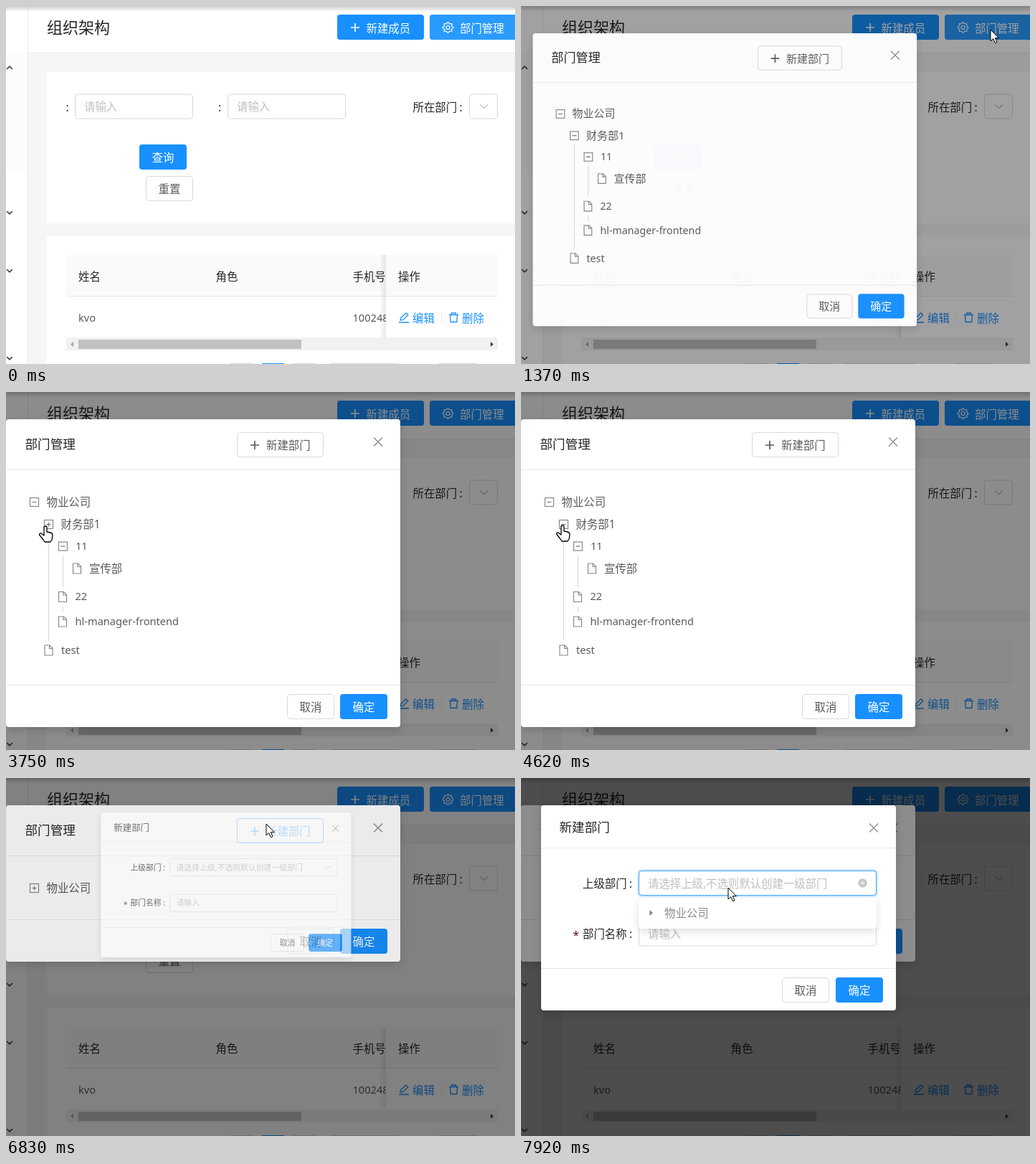
An HTML page for the animation above (8000 ms loop, 710 px wide and 499 px high).

```html
<!DOCTYPE html>
<html lang="zh">
<head>
<meta charset="utf-8">
<style>
html, body { margin: 0; width: 100%; height: 100%; overflow: hidden; background: #fff; }
svg { display: block; font-family: "Noto Sans", "Noto Sans CJK SC", "Noto Sans CJK", sans-serif; font-weight: 350; }
.panel { filter: drop-shadow(0 4px 6px rgba(0, 0, 0, .15)); }
</style>
</head>
<body>
<svg id="stage" width="710" height="499" viewBox="0 0 710 499"></svg>
<script>
const BLUE = '#1890ff', DARK = 'rgba(0,0,0,.85)', TEXT = 'rgba(0,0,0,.65)', HINT = '#bfbfbf', LINE = '#e8e8e8';
const LOOP = 8000, ROOT_H = 211, SUB_H = 145;

// Drawing helpers; text is placed by its left edge and vertical middle
const text = (x, y, s, fill = TEXT, size = 15.4) =>
  `<text x="${x}" y="${y + size * .36}" font-size="${size}" fill="${fill}">${s}</text>`;
const latin = (x, y, s) => text(x, y, s, TEXT, 14.6);
const rect = (x, y, w, h, fill, more = '') =>
  `<rect x="${x}" y="${y}" width="${w}" height="${h}" fill="${fill}" ${more}/>`;
const path = (d, stroke, width = 1, more = '') =>
  `<path d="${d}" fill="none" stroke="${stroke}" stroke-width="${width}" ${more}/>`;
const outline = (x, y, w, h, more = '') =>
  rect(x + .5, y + .5, w - 1, h - 1, '#fff', `rx="4" stroke="#d9d9d9" ${more}`);
const input = (x, y, w, hint) => outline(x, y, w, 35) + text(x + 13, y + 18, hint, HINT);
const button = (x, y, label) => outline(x, y, 66, 35) + text(x + 17.5, y + 18, label);
const primary = (x, y, label) => rect(x, y, 66, 35, BLUE, 'rx="4"') + text(x + 17.5, y + 18, label, '#fff');
const plus = (x, y, color) => path(`M${x - 6} ${y}h12M${x} ${y - 6}v12`, color, 1.7);
const close = (x, y) => path(`M${x - 6} ${y - 6}l12 12m0-12l-12 12`, 'rgba(0,0,0,.45)', 1.4);
const chevron = (x, y, w, color, width, dir = 1) =>
  path(`M${x - w} ${y - dir * w / 2}l${w} ${dir * w} ${w} ${-dir * w}`, color, width);
const hline = (x, y, w) => rect(x, y, w, 1, LINE);

const toggle = (x, y, id) => rect(x - 6, y - 6, 12, 12, '#fff', 'stroke="#888" stroke-width="1.2"') +
  path(`M${x - 3} ${y}h6`, '#777', 1.2) + (id ? path(`M${x} ${y - 3}v6`, '#777', 1.2, `id="${id}"`) : '');
const file = (x, y) => path(`M${x - 5.5} ${y - 7}h7l4 4v10h-11zM${x + 1} ${y - 7}v4.5h4.5`, '#888', 1.2);
const guide = (x, y, h) => rect(x, y, 1, h, '#d9d9d9');

function gear(x, y) {
  let d = '';
  for (let i = 0; i < 32; i++) {
    const a = (i - .5) / 32 * 2 * Math.PI, r = i % 4 < 2 ? 7.2 : 5.7;
    d += `${i ? 'L' : 'M'}${x + r * Math.sin(a)} ${y - r * Math.cos(a)}`;
  }
  return path(d + 'z', '#fff', 1.2) + `<circle cx="${x}" cy="${y}" r="2.5" fill="none" stroke="#fff" stroke-width="1.2"/>`;
}

const page =
  rect(0, 0, 710, 499, '#f5f6f8') + rect(0, 0, 30, 499, '#fff') + rect(0, 65, 30, 163, '#fcfcfc') +
  rect(30, 0, 1, 499, '#ebebeb') + rect(31, 0, 679, 65, '#fff') + hline(31, 65, 679) +
  rect(0, 0, 710, 8, 'url(#top)') +
  chevron(5, 86, 3.8, '#444', 1.6, -1) + [288, 369, 491].map(y => chevron(5, y, 3.8, '#444', 1.6)).join('') +
  text(57, 30, '组织架构', DARK, 22) +
  rect(462, 12, 121, 35, BLUE, 'rx="4"') + plus(487, 30, '#fff') + text(502.5, 31, '新建成员', '#fff') +
  rect(591, 12, 130, 35, BLUE, 'rx="4"') + rect(591, 12, 130, 35, '#40a9ff', 'rx="4" id="hover"') +
  gear(616.5, 30) + text(633, 31, '部门管理', '#fff') +
  // Search form
  rect(57, 92, 653, 211, '#fff') +
  text(83.5, 141, ':', DARK) + input(96, 122.5, 165, '请输入') +
  text(296, 141, ':', DARK) + input(309, 122.5, 165, '请输入') +
  text(567.5, 141, '所在部门', DARK) + text(632.5, 141, ':', DARK) +
  outline(646, 122.5, 40, 35) + chevron(666.5, 140, 5.5, HINT, 1.2) +
  primary(186, 193, '查询') + button(195, 237, '重置') +
  // Table
  rect(57, 321, 653, 178, '#fff') + rect(84, 347, 602, 57, '#fafafa') + hline(84, 404, 602) +
  text(101, 377, '姓名', DARK) + text(292.5, 377, '角色', DARK) + text(483.5, 377, '手机号', DARK) +
  latin(101, 435, 'kvo') + latin(483.5, 435, '100248') +
  rect(530, 347, 156, 57, '#fafafa') + rect(530, 405, 156, 57, '#fff') + rect(521, 347, 9, 115, 'url(#side)') +
  text(547, 377, '操作', DARK) + hline(530, 404, 156) +
  path('M548 441h14M550 438l.8-3.5 7.2-6.5 2.8 2.8-7 6.6z', BLUE, 1.3) + text(567, 435, '编辑', BLUE) +
  rect(607, 429, 1, 12, LINE) +
  path('M618 430.5h13M621.5 430v-2h6v2M619.5 431l.7 9.5h8.6l.7-9.5', BLUE, 1.3) + text(636, 435, '删除', BLUE) +
  rect(84, 462, 602, 18, '#f1f1f1') + rect(101, 465, 311, 13, '#c1c1c1') +
  '<path d="M94 468v7l-4-3.5z" fill="#a3a3a3"/><path d="M676 468v7l4-3.5z" fill="#444"/>' +
  [[313, 32], [400, 32], [453, 95], [604, 53]].map(([x, w]) => rect(x, 498, w, 1, '#d9d9d9')).join('') +
  rect(357, 498, 31, 1, BLUE);

const tree =
  toggle(39.5, 153.5, 'rootPlus') + text(56.5, 153, '物业公司') +
  `<g clip-path="url(#rootClip)">` +
    toggle(59.5, 184.5, 'subPlus') + text(76.5, 184, '财务部1') +
    `<g clip-path="url(#subClip)">` +
      guide(59, 197, 150) + guide(79, 228, 44) + guide(79, 299, 8) +
      toggle(79.5, 215) + latin(97, 215, '11') +
      file(99, 246) + text(116, 246, '宣传部') +
      file(79, 285.5) + latin(96.5, 285, '22') +
      file(79, 320) + latin(96.5, 320, 'hl-manager-frontend') +
    `</g>` +
    `<g id="lastRow">${file(59.5, 360)}${latin(77, 360, 'test')}</g>` +
  `</g>`;

const manage =
  rect(0, 38, 550, 429, '#fff', 'rx="4" class="panel" id="sheet"') +
  text(26.5, 73, '部门管理', DARK, 17.6) + outline(322, 56, 121, 35, 'id="newBox"') +
  plus(347, 74, 'currentColor') + text(363, 74.5, '新建部门', 'currentColor') +
  close(519, 69.5) + hline(0, 108, 550) + tree +
  `<g id="foot">${hline(0, 408, 550)}${button(392, 421, '取消')}${primary(466, 421, '确定')}</g>`;

const create =
  rect(28, 38, 495, 286, '#fff', 'rx="4" class="panel"') +
  text(53.5, 69, '新建部门', DARK, 17.6) + close(492, 69.5) + hline(28, 97, 495) +
  text(86, 147, '上级部门', DARK) + text(151, 147, ':', DARK) +
  rect(162, 127, 336, 39, 'rgba(24,144,255,.2)', 'rx="6" class="focus"') +
  input(164, 129, 332, '请选择上级,不选则默认创建一级部门') +
  rect(164.5, 129.5, 331, 34, 'none', 'rx="4" stroke="#40a9ff" class="focus"') +
  `<g id="arrow">${chevron(476, 146.5, 5, HINT, 1.2)}</g>` +
  `<g class="focus"><circle cx="476.5" cy="146.5" r="6.2" fill="#c8c8c8"/>${path('M474.5 144.5l4 4m0-4l-4 4', '#eee', 1.2)}</g>` +
  text(72.5, 219, '*', '#5a1212') + text(86, 217, '部门名称', DARK) + text(151, 217, ':', DARK) +
  input(164, 199.5, 332, '请输入') +
  hline(28, 265, 495) + button(364, 278, '取消') + primary(439, 278, '确定') +
  `<g id="menu">${rect(164, 168, 332, 42, '#fff', 'rx="4" class="panel"')}` +
  `<path d="M179.5 184v8l4.500-4z" fill="#777"/>${text(200, 188, '物业公司', 'rgba(0,0,0,.5)')}</g>`;

const stage = document.getElementById('stage');
stage.innerHTML = `<defs>
  <linearGradient id="top" x2="0" y2="1"><stop stop-opacity=".2"/><stop offset="1" stop-opacity="0"/></linearGradient>
  <linearGradient id="side"><stop stop-opacity="0"/><stop offset="1" stop-opacity=".09"/></linearGradient>
  <clipPath id="rootClip"><rect x="0" y="167" width="550" height="211" id="rootBox"/></clipPath>
  <clipPath id="subClip"><rect x="0" y="196" width="550" height="152" id="subBox"/></clipPath></defs>` +
  page + rect(0, 0, 710, 499, '#000', 'id="mask1"') + `<g id="manage">${manage}</g>` +
  rect(0, 0, 710, 499, '#000', 'id="mask2"') + `<g id="create">${create}</g>` +
  `<g id="cursor" stroke="#000" fill="#fff" stroke-linejoin="round">
    <path id="pointer" d="M0 0v16l3.7-3.5 2.8 6.2 2.5-1.1-2.7-6h5z"/>
    <path id="hand" stroke-width="1.3" d="M-2 1.5Q-2 0 0 0Q2 0 2 1.5V8l5 1q3 .6 3 4l-1 6-2 3h-8l-2-3-5.5-7q0-2.5 2.5-2l4 3z"/></g>`;

const el = {};
stage.querySelectorAll('[id]').forEach(n => el[n.id] = n);
const focusParts = stage.querySelectorAll('.focus');
const set = (id, name, value) => el[id].setAttribute(name, value);
const show = (node, on) => node.style.display = on ? '' : 'none';
const clamp = v => Math.max(0, Math.min(1, v));

// Linear track through [time, value] pairs
function track(t, keys) {
  let [t0, v0] = keys[0];
  for (const [t1, v1] of keys) {
    if (t < t1) return t1 > t0 ? v0 + (v1 - v0) * clamp((t - t0) / (t1 - t0)) : v0;
    [t0, v0] = [t1, v1];
  }
  return v0;
}

// cubic-bezier(.08, .82, .17, 1)
function easeOut(x) {
  let lo = 0, hi = 1;
  const curve = (u, a, b) => 3 * (1 - u) ** 2 * u * a + 3 * (1 - u) * u * u * b + u ** 3;
  for (let i = 0; i < 20; i++) {
    const mid = (lo + hi) / 2;
    if (curve(mid, .08, .17) < x) lo = mid; else hi = mid;
  }
  return curve(hi, .82, 1);
}

function zoom(id, mask, t, start, ox, oy) {
  const p = easeOut(clamp((t - start) / 300)), s = .2 + .8 * p;
  show(el[id], t > start);
  set(id, 'opacity', p);
  set(id, 'transform', `translate(${ox * (1 - s)} ${oy * (1 - s)}) scale(${s})`);
  set(mask, 'opacity', .45 * clamp((t - start) / 200));
}

const route = [
  [70, 655, 444], [140, 664, 270], [210, 672, 79], [440, 672, 79], [830, 655, 33], [1600, 655, 33],
  [1830, 530, 40], [1910, 525, 60], [2200, 330, 330], [2330, 190, 400], [2600, 45, 165], [2680, 39, 152],
  [3230, 39, 152], [3670, 54, 184], [3750, 55, 187], [4300, 55, 187], [4450, 58, 186], [4700, 58, 186],
  [5090, 49, 150], [5170, 47, 150], [5320, 42, 150], [5490, 42, 149], [5640, 66, 136], [5800, 66, 136],
  [5880, 76, 135], [6200, 76, 135], [6670, 363, 64], [7230, 363, 64], [7700, 289, 153]
];
const routeX = route.map(([t, x]) => [t, x]), routeY = route.map(([t, , y]) => [t, y]);

function draw(t) {
  const root = track(t, [[1208, 60], [1370, 10], [1450, 0], [2710, 0], [2846, ROOT_H], [2990, ROOT_H], [3200, 0],
    [5470, 0], [5640, ROOT_H]]);
  const sub = track(t, [[3755, 0], [3910, SUB_H], [4290, SUB_H], [4500, 0]]);
  const cut = root + sub;
  set('sheet', 'height', 429 - cut);
  set('foot', 'transform', `translate(0 ${-cut})`);
  set('rootBox', 'height', Math.max(0, 211 - cut));
  set('subBox', 'height', 152 * (1 - sub / SUB_H));
  set('lastRow', 'transform', `translate(0 ${-sub})`);
  show(el.rootPlus, t > 2700 && t < 2990 || t > 5460);
  show(el.subPlus, t > 3740 && t < 4290);

  set('hover', 'opacity', track(t, [[0, .45], [210, 0], [440, 0], [740, 1], [1200, 1], [1500, 0]]));
  const hot = t > 6550 && t < 7300 ? '#40a9ff' : '';
  el.manage.style.color = hot || TEXT;
  set('newBox', 'stroke', hot || '#d9d9d9');

  zoom('manage', 'mask1', t, 1208, 630, 38);
  zoom('create', 'mask2', t, 6797, 382, 72);

  const focused = t > 7760;
  focusParts.forEach(n => show(n, focused));
  show(el.arrow, !focused);
  set('menu', 'opacity', track(t, [[7830, 0], [7920, .9], [7980, 1]]));

  const hand = t > 2640 && t < 5560;
  show(el.cursor, t >= 70);
  show(el.hand, hand);
  show(el.pointer, !hand);
  set('cursor', 'transform', `translate(${track(t, routeX)} ${track(t, routeY)})`);
}

function frame() {
  draw(performance.now() % LOOP);
  requestAnimationFrame(frame);
}
frame();
</script>
</body>
</html>
```
